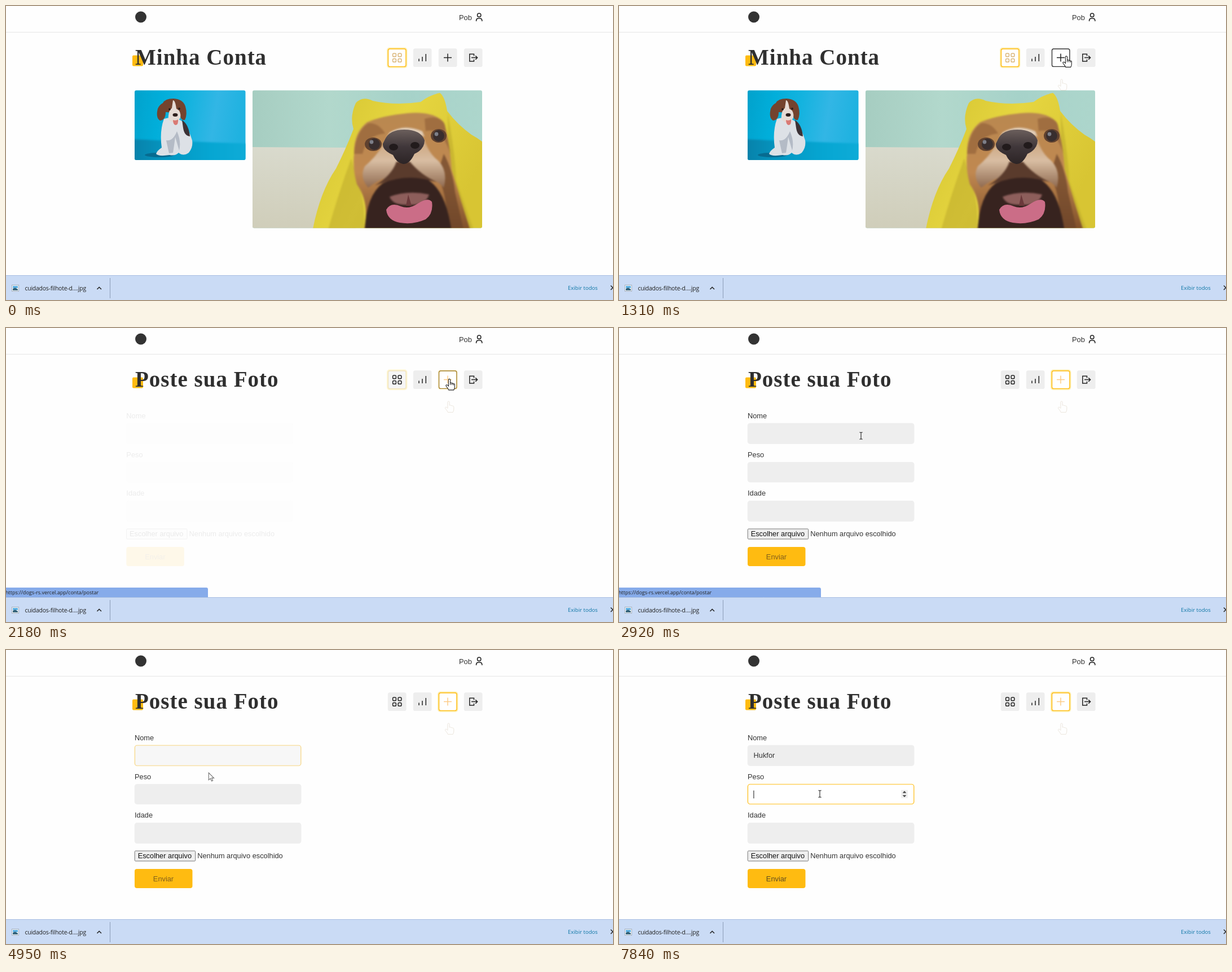
An HTML page that plays this animation: 1076x521 px, repeating every 8000 ms.

```html
<!DOCTYPE html>
<html lang="pt">
<head>
<meta charset="utf-8">
<title>Minha Conta</title>
<style>
html, body { margin: 0; width: 100%; height: 100%; overflow: hidden; background: #fefefe; }
svg { display: block; width: 100vw; height: 100vh; }
text { font: 12.8px "Liberation Sans", Arial, sans-serif; fill: #333; white-space: pre; }
.title { font: bold 39px "Liberation Serif", serif; letter-spacing: 1px; fill: #2f2f2f; }
.ui { font-family: "Open Sans", "Noto Sans", sans-serif; fill: #222; }
.icon { fill: none; stroke: #222; stroke-width: 1.5; }
.soft { filter: blur(1.6px); }
.crisp { filter: blur(.6px); }
</style>
</head>
<body>
<svg id="stage" viewBox="0 0 1076 521" preserveAspectRatio="none"></svg>
<script>
const LOOP = 8000;
const YELLOW = [255, 187, 17], GREY = [238, 238, 238], WHITE = [255, 255, 255], DARK = [51, 51, 51];

const clamp = v => Math.max(0, Math.min(1, v));
const ramp = (t, a, b) => clamp((t - a) / (b - a));
const ease = p => p * p * (3 - 2 * p);
const mix = (a, b, p) => `rgb(${a.map((v, i) => Math.round(v + (b[i] - v) * p))})`;
const el = id => document.getElementById(id);
const set = (id, attrs) => { for (const k in attrs) el(id).setAttribute(k, attrs[k]); };
const show = (id, on) => set(id, { opacity: +on });

const shape = (fill, d, extra = '') => `<path fill="${fill}" d="${d}" ${extra}/>`;
const oval = (fill, x, y, rx, ry = rx) => `<ellipse cx="${x}" cy="${y}" rx="${rx}" ry="${ry}" fill="${fill}"/>`;
const gradient = (id, dir, ...stops) => `<linearGradient id="${id}" ${dir}>` + stops.map((c, i) =>
  `<stop offset="${i / (stops.length - 1)}" stop-color="${c}"/>`).join('') + '</linearGradient>';
const clip = (id, x, y, w, h) =>
  `<clipPath id="${id}"><rect x="${x}" y="${y}" width="${w}" height="${h}" rx="3"/></clipPath>`;

const defs = `<defs>
  ${gradient('sky', 'x2="1" y2=".1"', '#02a2cc', '#01aeda', '#14b3df', '#32b6e5', '#1fb2e0')}
  ${gradient('floor', 'x2="1" y2="0"', '#0880a8', '#0498c3', '#06a6d2', '#10acd8')}
  ${gradient('teal', 'x2="1" y2="0"', '#a6cdc1', '#b2d8cc', '#a6d2c9', '#add6cc')}
  ${gradient('cream', 'x2="0" y2="1"', '#d9dacd', '#cfcdb9')}
  ${gradient('towel', 'x2="1" y2=".4"', '#d3c230', '#e6d640', '#d8c533')}
  ${gradient('fur', 'x2="0" y2="1"', '#b98850', '#c08850', '#7d4d28')}
  ${gradient('muzzle', 'x2="0" y2="1"', '#c79c70', '#d8bda2', '#8f6a50')}
  ${gradient('nose', 'x2="0" y2="1"', '#6b5f5c', '#40373a', '#2c2425')}
  ${clip('clipA', 228, 149.5, 196.5, 123.5)}${clip('clipB', 437, 149.5, 407, 244)}
</defs>`;

const puppy = `<g clip-path="url(#clipA)">
  <rect x="228" y="149" width="197" height="125" fill="url(#sky)"/>
  <path class="soft" fill="url(#floor)" d="M220 236Q320 240 435 244V284H220Z"/>
  <g class="crisp">
  ${oval('#076b90', 272, 264, 26, 4)}
  ${shape('#dde1e6', 'M280 200Q300 194 314 206Q324 218 330 238Q332 250 324 260Q314 267 306 260Q300 266 290 264Q270 267 266 262Q268 256 276 251Q272 222 280 200Z')}
  ${shape('#b4bbc6', 'M284 238Q287 252 289 261L296 260Q298 248 300 232L307 256Q311 240 303 222Q296 240 284 238Z')}
  ${shape('#3b3236', 'M312 202Q324 210 326 231Q316 230 314 216Z')}
  ${shape('#74432e', 'M278 172Q282 164 297 164Q314 165 318 178Q322 192 317 202Q308 203 309 190L283 188Q283 202 273 203Q265 198 269 182Q272 175 278 172Z')}
  ${shape('#e6dbd5', 'M296 167Q300 167 302 182Q311 186 309 198Q303 209 295 206Q286 203 288 194Q289 184 294 181Z')}
  ${oval('#2b1d1c', 300, 193, 4.5, 3)}${oval('#2b1d1c', 290, 183, 1.9)}${oval('#2b1d1c', 307, 182, 1.9)}
  ${shape('#d97a74', 'M296 202Q301 204 305 201Q306 211 300 211Q296 209 296 202Z')}
  </g>
</g>`;

const portrait = `<g clip-path="url(#clipB)">
  <rect x="437" y="149" width="408" height="245" fill="url(#teal)"/>
  <path class="crisp" fill="url(#cream)" d="M430 250L620 251V400H430Z"/>
  <path fill="url(#towel)" class="crisp" d="M543 400Q556 330 585 288Q604 250 616 218Q609 196 620 172Q632 159 650 168Q690 177 735 170Q750 158 769 154Q778 160 782 186Q800 210 825 228Q840 236 856 250V400Z"/>
  <g class="soft">
  ${shape('#b9a52a', 'M570 400Q590 330 612 270L620 300Q640 350 634 400ZM783 190Q796 260 798 310L830 400H786Z', 'opacity=".5"')}
  <path fill="url(#fur)" d="M617 262Q616 225 640 206Q668 194 712 190Q758 186 776 206Q786 236 790 290Q806 345 824 400H634Q646 350 622 316Q614 288 617 262Z"/>
  ${shape('#8a5a33', 'M617 262Q620 222 642 208Q660 206 672 226Q640 228 632 262ZM742 200Q768 192 778 210L788 262Q772 214 744 222Z', 'opacity=".55"')}
  ${shape('#6b432a', 'M776 262Q792 290 796 330L812 400H780Q786 340 764 300Z', 'opacity=".7"')}
  <path fill="url(#muzzle)" d="M672 238Q660 264 636 284Q626 304 642 322Q660 308 676 304H742Q764 308 776 322Q784 292 766 274Q750 262 742 238Q706 214 672 238Z"/>
  ${shape('#e0cdb8', 'M680 224Q706 208 738 222L742 232Q706 212 674 234Z')}
  ${shape('#5a3b2c', 'M692 276H716Q736 300 764 312Q706 298 654 318Q684 300 692 276Z')}
  ${shape('#37231f', 'M636 400Q638 336 668 314Q706 298 748 308Q780 328 790 400Z')}
  ${shape('#8d5e5b', 'M680 338Q712 326 750 334Q744 354 714 352Q686 354 680 338Z')}
  </g>
  <g class="crisp">
  ${shape('#6b393b', 'M713 334L709 354L719 354Z')}
  ${shape('#cb6d87', 'M674 361Q682 347 700 355Q714 361 730 350Q748 338 755 347Q758 368 744 378Q722 388 698 384Q676 380 674 361Z')}
  ${oval('#5f412f', 651, 245, 15, 12)}${oval('#382e2e', 653, 245, 10)}${oval('#7d7f88', 648, 241, 3.4)}
  ${oval('#5f412f', 767, 230, 14, 12)}${oval('#382e2e', 767, 230, 10)}${oval('#7d7f88', 763, 227, 3.4)}
  <path fill="url(#nose)" d="M672 236Q680 219 706 219Q735 219 742 238Q742 254 724 262Q716 280 704 280Q692 278 686 264Q667 256 668 244Z"/>
  ${oval('#221b1c', 687, 250, 8, 6)}${oval('#221b1c', 725, 247, 8, 6)}
  </g>
</g>`;

const icons = [
  [0, 9.5].flatMap(x => [0, 9.5].map(y =>
    `<rect x="${685.6 + x}" y="${83.9 + y}" width="5.8" height="5.8" rx="1.8"/>`)).join(''),
  '<path d="M732 93.5V98M738 90V98M744.3 85V98"/>',
  '<path d="M776 91.5H790M783 84.5V98.5"/>',
  '<path d="M829.5 88.5V85.2H821.8V98H829.5V94.7M825 91.6H835.5M832.2 88.2L835.6 91.6L832.2 95"/>'
];
const nav = icons.map((icon, i) => {
  const x = 677 + i * 45;
  return `<rect id="glow${i}" x="${x - 2}" y="73.5" width="36.4" height="36.4" rx="5" fill="#fdeeb0" opacity="0"/>
    <rect id="btn${i}" x="${x + .5}" y="76" width="31.4" height="31.4" rx="3" fill="#eee" stroke="#eee" stroke-width="1.4"/>
    <g id="icon${i}" class="icon">${icon}</g>`;
}).join('');

const header = `<rect width="1076" height="521" fill="#fefefe"/>
  <path d="M0 46.5H1076" stroke="#e5e5e5"/>
  <circle cx="239" cy="19.5" r="10" fill="#333"/>
  <text x="803" y="25">Pob</text>
  <g class="icon"><circle cx="838.7" cy="16.2" r="3.2"/><path d="M833.6 27V25.4Q834 22 837 22H840.4Q843.4 22 843.8 25.4V27"/></g>
  <rect x="224" y="87.5" width="19" height="19" rx="2" fill="#fb1"/>
  <text id="title" class="title" x="229" y="103.5"></text>`;

const field = (id, label, y, h) => `<text x="228" y="${y - 8.6}">${label}</text>
  <rect id="${id}" x="228.4" y="${y + .5}" width="294.4" height="${h}" rx="4" fill="#eee" stroke="#eee" stroke-width="1.2"/>`;
const form = `<g id="form">
  ${field('nome', 'Nome', 168.5, 36)}${field('peso', 'Peso', 237.5, 35)}${field('idade', 'Idade', 306, 36)}
  <text id="typed" x="238.6" y="191"></text>
  <rect id="caret" y="180" width="1" height="14" fill="#111"/>
  <g id="spin"><rect x="500" y="248" width="12" height="14.5" fill="#efefef"/>
    <path d="M502.6 253.4L506 249.8L509.4 253.4ZM502.6 257.2L506 260.8L509.4 257.2Z" fill="#444"/></g>
  <rect x="228.2" y="356" width="107.5" height="18" rx="1.5" fill="#efefef" stroke="#767676"/>
  <text x="233.7" y="369.4" style="fill:#111">Escolher arquivo</text>
  <text x="339.2" y="369.4">Nenhum arquivo escolhido</text>
  <rect x="228" y="388" width="102.5" height="34" rx="4" fill="#fb1"/>
  <text id="send" x="279" y="409.6" text-anchor="middle">Enviar</text>
</g>`;

const shelf = `<g id="status"><path d="M0 460H355Q358 460 358 463V477H0Z" fill="#86abea"/>
    <text class="ui" x="-1" y="472" style="font-size:9.05px">https://dogs-rs.vercel.app/conta/postar</text></g>
  <rect y="477" width="1076" height="44" fill="#cadbf5"/>
  <path d="M0 477.5H1076" stroke="#a9bfe2"/><path d="M184.5 482V518" stroke="#8b9cb8"/>
  <rect x="10.5" y="494.5" width="12" height="11" fill="#fff" stroke="#a4afbd"/>
  <path d="M12 496H21V500H12Z" fill="#5fb2e4"/><path d="M12 504V501L16 499L21 502V504Z" fill="#34637a"/>
  <text class="ui" x="33.5" y="504" style="font-size:10.4px;letter-spacing:-.2px">cuidados-filhote-d....jpg</text>
  <path class="icon" d="M161.5 502L165.2 498.2L169 502"/>
  <text class="ui" x="996" y="502.5" style="font-size:9.6px;fill:#0d76a6">Exibir todos</text>
  <path class="icon" d="M1072 495.5L1079.5 503M1072 503L1079.5 495.5"/>`;

const HAND = 'M-1.6 1.5a1.6 1.6 0 0 1 3.2 0V7q2.6-.9 2.9.6 2.4-.7 2.8.7 2-.3 2 1.3V14q0 3-1.6 5.4H-1.2Q-3 15.5-5.6 12.8q-1.4-2 .6-2.6 1.6-.2 3.4 2.2z';
const pointers = `<path id="ghost" d="${HAND}" transform="translate(784.5 130)" fill="#fff" stroke="#c0ae92" opacity=".3"/>
  <g id="cursor" stroke="#222" fill="#fff" stroke-width="1.1">
    <path id="arrow" d="M.5 .5V13.4L3.6 10.7L5.7 15.3L7.8 14.4L5.8 9.9H9.8Z"/>
    <path id="hand" d="${HAND}M1.6 7v3.4M4.5 8v2.6M7.3 8.6v2.4"/>
    <path id="beam" d="M-2.7-6H-.8L0-5.2 .8-6H2.7M0-5.2V5.2M-2.7 6H-.8L0 5.2 .8 6H2.7" fill="none"/>
  </g>`;

el('stage').innerHTML = defs + header + nav +
  `<g id="photos">${puppy}${portrait}</g>` + form + shelf + pointers;

// Pointer stops: time, x, y, look from that time on
const PATH = [
  [380, 1014, 506, 'arrow'], [600, 925, 425, 'arrow'], [740, 843, 310, 'hand'], [900, 800, 205, 'hand'],
  [1030, 785, 130, 'hand'], [1110, 790, 76, 'hand'], [1170, 793, 89, 'hand'], [1710, 793, 89, 'hand'],
  [2040, 786, 90.5, 'hand'], [2720, 786, 90.5, 'arrow'], [2800, 650, 130, 'arrow'], [2900, 429, 191, 'beam'],
  [3000, 429, 191, 'beam'], [3420, 376, 189, 'beam'], [3680, 376, 189, 'beam'], [3760, 365, 207, 'arrow'],
  [3820, 358.8, 217, 'arrow'], [6970, 375, 232, 'arrow'], [7050, 375, 232, 'arrow'],
  [7200, 366, 245, 'beam'], [7500, 356, 255, 'beam'], [LOOP, 356, 255, 'beam']
];
// Typed letters: time and caret position after each
const KEYS = [[5110, 248], [5230, 255.2], [5440, 261.6], [6030, 265.2], [6170, 272.3], [6370, 276.4]];
const NAME = 'Hukfor';

function drawPointer(t) {
  const i = PATH.findLastIndex(p => p[0] <= t);
  const shown = i >= 0 && !(t >= 5110 && t < 6970);
  show('cursor', shown);
  if (!shown) return;
  const a = PATH[i], b = PATH[i + 1] || a;
  const p = a[0] === 3820 ? 0 : ramp(t, a[0], b[0]);
  set('cursor', {
    transform: `translate(${a[1] + (b[1] - a[1]) * p} ${a[2] + (b[2] - a[2]) * p})`,
    opacity: t >= 4950 && t < 5110 ? .65 : 1
  });
  ['arrow', 'hand', 'beam'].forEach(k => show(k, k === a[3]));
}

function drawNav(t, posting) {
  const k = posting ? .55 + .45 * ramp(t, 2180, 2300) : 0;
  const fade = ramp(t, 2180, 2300);
  const hover = ramp(t, 1220, 1300);
  set('btn0', { fill: mix(WHITE, GREY, k), stroke: mix(YELLOW, GREY, posting ? .8 + .2 * fade : 0) });
  set('glow0', { opacity: posting ? .6 * (1 - fade) : 1 });
  set('icon0', { style: `stroke:${posting ? '#222' : '#dab679'}` });
  set('btn2', { fill: mix(GREY, WHITE, hover), stroke: posting ? mix(DARK, YELLOW, k) : mix(GREY, DARK, hover) });
  set('glow2', { opacity: posting ? ramp(k, .4, 1) : 0 });
  set('icon2', { style: `stroke:${posting ? '#fdcb86' : '#222'}` });
}

function drawForm(t) {
  const p = ease(ramp(t, 2122, 2450));
  set('form', { transform: `translate(${-16 * (1 - p)} 0)`, opacity: p });
  const focus = t < 4950 ? 0 : t < 5110 ? .5 : t < 7780 ? 1 : t < 7840 ? .5 : 0;
  const peso = t >= 6970;
  set('nome', { fill: mix(GREY, WHITE, focus), stroke: mix(GREY, YELLOW, focus) });
  set('peso', { fill: peso ? '#fff' : '#eee', stroke: peso ? '#fb1' : '#eee' });
  show('spin', peso);

  const count = KEYS.filter(k => k[0] <= t).length;
  el('typed').textContent = NAME.slice(0, count);
  const moved = t >= 7650;
  set('caret', { x: moved || !count ? 238.4 : KEYS[count - 1][1], y: moved ? 249 : 180, opacity: +(count > 0) });
  set('send', { style: `fill:${t < 5110 ? '#805e1c' : '#5f4b20'}` });
}

function draw(t) {
  const posting = t >= 2180;
  el('title').textContent = posting ? 'Poste sua Foto' : 'Minha Conta';
  show('photos', !posting);
  drawNav(t, posting);
  if (posting) drawForm(t);
  else show('form', false);
  set('status', { opacity: ramp(t, 1700, 1780) * (1 - ramp(t, 3350, 3420)) });
  set('ghost', { opacity: t >= 1100 ? .3 : 0 });
  drawPointer(t);
}

function tick() {
  draw(performance.now() % LOOP);
  requestAnimationFrame(tick);
}
tick();
</script>
</body>
</html>
```
